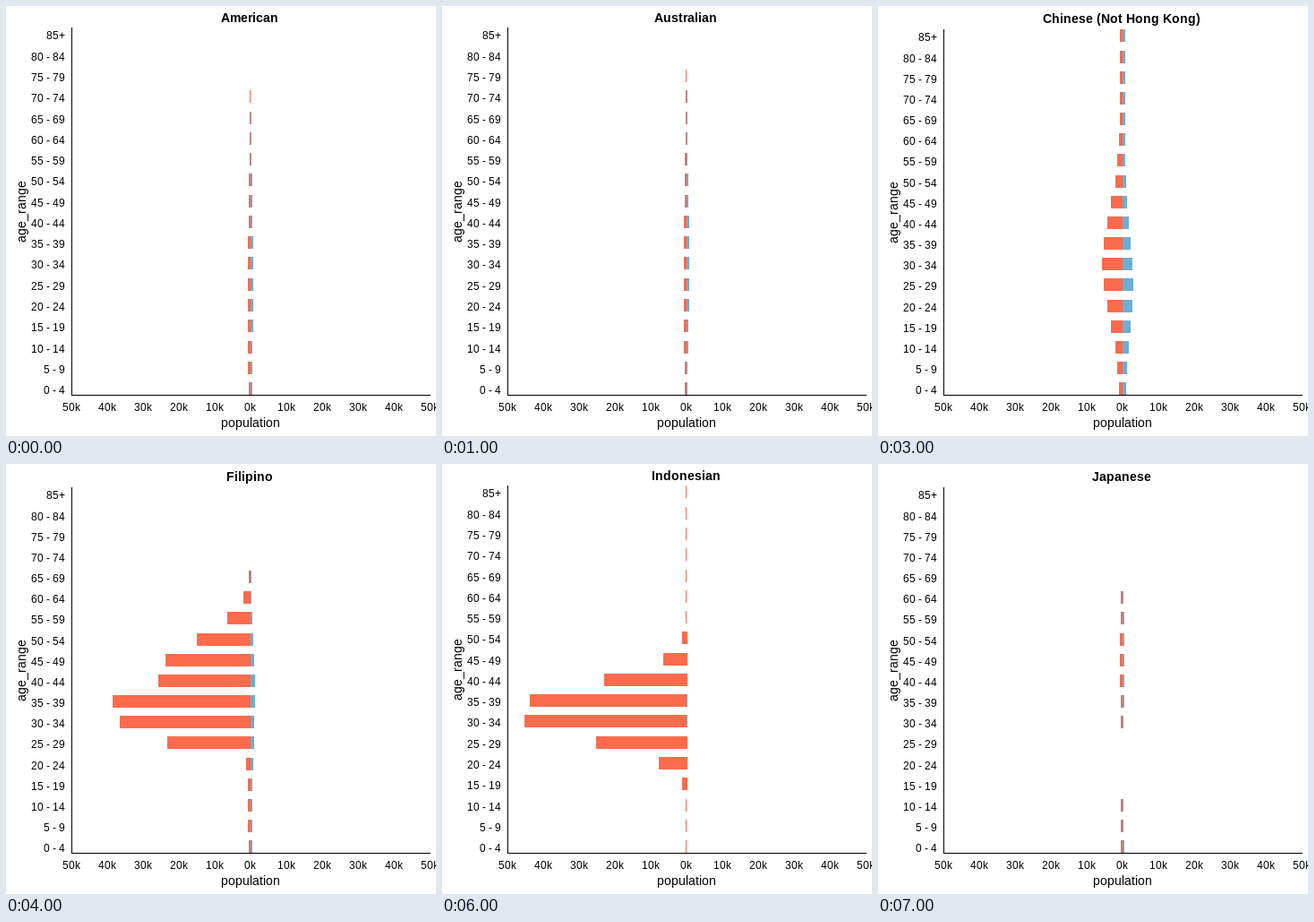
Recreate the animation shown at these times as an HTML page with a canvas. Size 480x480 px, loop 8 s.

```html
<!DOCTYPE html>
<html lang="en">
<head>
<meta charset="utf-8">
<title>Population pyramid</title>
<style>
  html, body { margin: 0; width: 100%; height: 100%; overflow: hidden; background: #fff; }
  canvas { display: block; }
</style>
</head>
<body>
<canvas id="chart" width="480" height="480"></canvas>
<script>
const ctx = document.getElementById('chart').getContext('2d');
const HOLD = 1000, ROWS = 18, BAR = 14;
const LEFT = 73, ZERO = 273, RIGHT = 474, BOTTOM = 434;
const ORANGE = '#fc6b4b', BLUE = '#6baed6';
const FACE = '"Liberation Sans", Arial, sans-serif';
const TICK = `12px ${FACE}`, LABEL = `14px ${FACE}`, TITLE = `bold 14px ${FACE}`;

// A bell curve over the age rows; a higher power gives a flatter top.
const bell = (peak, centre, spread, power = 2) => row =>
  peak * Math.exp(-(Math.abs((row - centre) / spread) ** power));
const flat = level => () => level;
const sum = (...curves) => row => curves.reduce((total, curve) => total + curve(row), 0);

// Bar lengths in pixels as curves, from the youngest row up.
const groups = [
  { title: 'American', left: bell(3, 4, 8), right: bell(2.8, 5, 6.8) },
  { title: 'Australian', left: bell(3, 5, 8), right: bell(3, 6, 6) },
  { title: 'British',
    left: bell(4.6, 5, 8.5),
    right: sum(bell(5, 0, 3.5), bell(9, 8.5, 4)) },
  { title: 'Chinese (Not Hong Kong)',
    left: sum(flat(3), bell(20, 6, 3.5)),
    right: sum(flat(3), bell(9, 5, 3.5)) },
  { title: 'Filipino',
    left: sum(bell(3, 1.5, 3), bell(107, 6, 1.34, 4), bell(104, 8.3, 2.3)),
    right: sum(bell(2, 0, 3), bell(5, 7.5, 4)) },
  { title: 'Indian',
    left: sum(flat(0.8), bell(3, 1, 7), bell(7.5, 6.3, 1.8)),
    right: sum(bell(2.8, 1, 10), bell(6.5, 6.6, 2)) },
  { title: 'Indonesian',
    left: sum(flat(0.6), bell(192, 6.45, 1.8)),
    right: bell(1, 6.5, 1) },
  { title: 'Japanese',
    left: sum(bell(2, 1, 1.6, 4), bell(2.7, 9, 3.5, 4)),
    right: sum(bell(1.6, 0, 2.2), bell(2, 9, 3.5, 4)) }
];

const ageLabel = row => row === ROWS - 1 ? '85+' : `${row * 5} - ${row * 5 + 4}`;

// Sets text with whole-pixel letter advances; align is 0 (left) to 1 (right).
function drawText(text, x, y, font, align) {
  ctx.font = font;
  const letters = [...text];
  const advances = letters.map(c => Math.round(ctx.measureText(c).width));
  let pen = Math.floor(x - align * advances.reduce((total, a) => total + a, 0));
  letters.forEach((c, i) => {
    ctx.fillText(c, pen, y);
    pen += advances[i];
  });
}

function drawBox(x, y, width, height, color) {
  ctx.fillStyle = color;
  ctx.fillRect(x, y, width, height);
}

function drawChart({ title, left, right }) {
  // A title with descenders takes more room and pushes the plot down.
  const drop = /[gjpqy]/.test(title) ? 2 : 0;
  const top = 24 + drop;
  const step = (BOTTOM - top - 0.4) / (ROWS - 0.4);

  drawBox(0, 0, 480, 480, '#fff');
  for (let row = 0; row < ROWS; row++) {
    const y = Math.round(top + 0.49 + (ROWS - 1 - row) * step);
    const l = Math.round(left(row)), r = Math.round(right(row));
    if (l) drawBox(ZERO - l, y, l + (l > 1 ? 1 : 0), BAR, ORANGE);
    if (r) drawBox(ZERO, y, r, BAR, BLUE);
    ctx.fillStyle = '#000';
    drawText(ageLabel(row), 66, y + 13, TICK, 1);
  }

  drawBox(LEFT, top, 1, BOTTOM - top + 1, '#000');
  drawBox(LEFT, BOTTOM, RIGHT - LEFT, 1, '#000');
  for (let i = 0; i <= 10; i++) {
    drawText(`${Math.abs(i - 5) * 10}k`, LEFT + i * 40, 452, TICK, 0.5);
  }
  drawText('population', ZERO, 470, LABEL, 0.5);
  drawText(title, ZERO - 0.5, 18 + drop / 2, TITLE, 0.5);

  ctx.save();
  ctx.translate(22, (top + BOTTOM) / 2);
  ctx.rotate(-Math.PI / 2);
  drawText('age_range', 0, 0, LABEL, 0.5);
  ctx.restore();
}

const start = performance.now();
function tick() {
  const elapsed = performance.now() - start;
  drawChart(groups[Math.floor(elapsed / HOLD) % groups.length]);
  requestAnimationFrame(tick);
}
tick();
</script>
</body>
</html>
```
